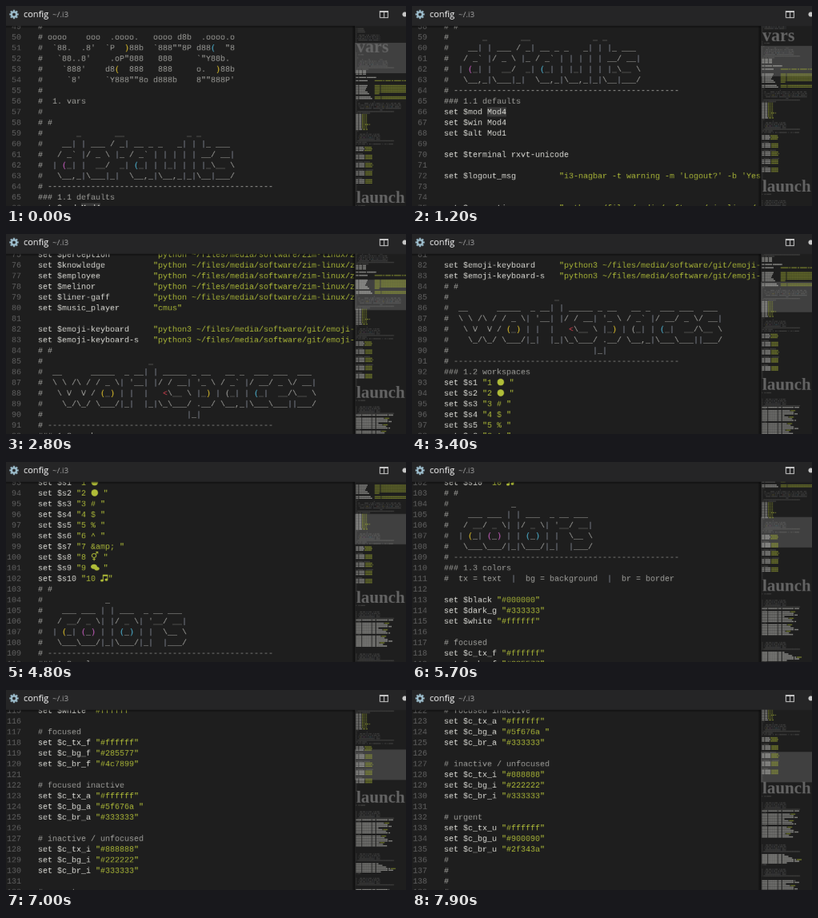
Write an HTML page with a canvas that moves like this. It is 500 by 250 pixels and loops after 8000 ms.

```html
<!DOCTYPE html>
<html lang="en">
<head>
<meta charset="utf-8">
<title>config</title>
<style>
html, body { margin: 0; width: 100%; height: 100%; overflow: hidden; background: #1e1e1e; }
canvas { display: block; }
</style>
</head>
<body>
<canvas id="stage" width="500" height="250"></canvas>
<script>
const stage = document.getElementById('stage').getContext('2d');
stage.imageSmoothingQuality = 'high';

// The editor is drawn at 1.5 times its size and scaled down like a screen recording.
const SCALE = 1.5;
const screen = document.createElement('canvas');
screen.width = 500 * SCALE;
screen.height = 250 * SCALE;
const ctx = screen.getContext('2d');
ctx.scale(SCALE, SCALE);

const LOOP = 8000, TICK = 100;
const FIRST = 50;                       // line at the top of the view at time zero
const HOLDS = [1, 3, 8, 27, 35, 46, 76, 78];
const DOUBLES = [24, 28];
const LINE = 20 / SCALE, BASELINE = 42, CHAR = 6, TEXT_X = 40;
const TOP = 25, MAP_X = 436, MAP_LINE = 2.03;

const color = {
  bg: '#1e1e1e', bar: '#252526', number: '#606060', code: '#e4e4de', string: '#b0bd38',
  comment: '#a4a4a0', stroke: '#9ca2b2', yellow: '#e6c62c', cyan: '#4fb8d8', pink: '#cc60c4', red: '#d84050'
};

const rule = '# ' + '-'.repeat(47);
const lines = {};
function put(start, text) {
  text.split('\n').forEach((line, i) => { lines[start + i] = line; });
}
const define = (name, value) => ('set $' + name).padEnd(24) + value;
const zim = '"python ~/files/media/software/zim-linux/zim.py"';
const emoji = '"python3 ~/files/media/software/git/emoji-keyboard"';

put(40, String.raw`# bindings
# variables
# workspaces
#
#   ___ ___  _ __  / _(_) __ _
#  / __/ _ \| '_ \| |_| |/ _' |
# | (_| (_) | | | |  _| | (_| |
#  \___\___/|_| |_|_| |_|\__, |
#
#
# oooo    ooo  .oooo.   oooo d8b  .oooo.o
#  ${'`'}88.  .8'  ${'`'}P  )88b  ${'`'}888""8P d88(  "8
#   ${'`'}88..8'    .oP"888   888     ${'`'}"Y88b.
#    ${'`'}888'    d8(  888   888     o.  )88b
#     ${'`'}8'     ${'`'}Y888""8o d888b    8""888P'
#
#  1. vars
#
# #
#       _       __             _ _
#    __| | ___ / _| __ _ _   _| | |_ ___
#   / _${'`'} |/ _ \ |_ / _${'`'} | | | | | __/ __|
#  | (_| |  __/  _| (_| | |_| | | |_\__ \
#   \__,_|\___|_|  \__,_|\__,_|_|\__|___/
${rule}
### 1.1 defaults
set $mod Mod4
set $win Mod4
set $alt Mod1

set $terminal rxvt-unicode
`);
put(72, [
  define('logout_msg', `"i3-nagbar -t warning -m 'Logout?' -b 'Yes' 'exit'"`), '', '',
  ...['perception', 'knowledge', 'employee', 'melinor', 'liner-gaff'].map(n => define(n, zim)),
  define('music_player', '"cmus"'), '',
  define('emoji-keyboard', emoji), define('emoji-keyboard-s', emoji)
].join('\n'));
put(84, String.raw`# #
#                      _
#  __      _____  _ __| | _____ _ __   __ _  ___ ___  ___
#  \ \ /\ / / _ \| '__| |/ / __| '_ \ / _${'`'} |/ __/ _ \/ __|
#   \ V  V / (_) | |  |   <\__ \ |_) | (_| | (_|  __/\__ \
#    \_/\_/ \___/|_|  |_|\_\___/ .__/ \__,_|\___\___||___/
#                              |_|
${rule}
### 1.2 workspaces`);
put(93, ['● ', '● ', '# ', '$ ', '% ', '^ ', '&amp; ', '⚥ ', '◖ ', '♫']
  .map((mark, i) => `set $s${i + 1} "${i + 1} ${mark}"`).join('\n'));
put(103, String.raw`# #
#             _
#    ___ ___ | | ___  _ __ ___
#   / __/ _ \| |/ _ \| '__/ __|
#  | (_| (_) | | (_) | |  \__ \
#   \___\___/|_|\___/|_|  |___/
${rule}
### 1.3 colors
#  tx = text  |  bg = background  |  br = border

set $black "#000000"
set $dark_g "#333333"
set $white "#ffffff"
`);
function palette(start, title, suffix, values) {
  const rows = ['tx', 'bg', 'br'].map((k, i) => `set $c_${k}_${suffix} "${values[i]}"`);
  put(start, ['# ' + title, ...rows, ''].join('\n'));
}
palette(117, 'focused', 'f', ['#ffffff', '#285577', '#4c7899']);
palette(122, 'focused inactive', 'a', ['#ffffff', '#5f676a ', '#333333']);
palette(127, 'inactive / unfocused', 'i', ['#888888', '#222222', '#333333']);
palette(132, 'urgent', 'u', ['#ffffff', '#900090', '#2f343a']);
put(136, '#\n#\n#\n#\n#');

// Lines below the view that only the minimap shows.
put(149, '#  2. launch');
for (const start of [153, 179, 194]) {
  put(start, [105, 106, 107, 108].map(n => lines[n]).join('\n') + '\n' + rule);
}
for (const [from, to] of [[158, 174], [185, 191], [201, 214]]) {
  for (let n = from; n <= to; n++) {
    const key = 'abcdefgh'[n % 8];
    const words = `bindsym $mod+Shift+${key} exec --no-startup-id i3-msg workspace`;
    put(n, n % 8 === 7 ? '# keys' : words.slice(0, 28 + n * 5 % 22) + (n % 4 ? '' : ' "cmus"'));
  }
}

const { yellow, cyan, pink, red, comment } = color;
const brackets = {
  51: [yellow, cyan], 53: [yellow, yellow], 62: [pink, cyan],
  88: [yellow, yellow, red, yellow, comment, cyan],
  107: [yellow, pink, pink, cyan, cyan]
};

// Splits a line into coloured characters.
function colorize(n) {
  const text = lines[n] || '';
  const isComment = text[0] === '#';
  const quote = text.indexOf('"');
  let found = 0;
  return [...text].map((ch, i) => {
    if (!isComment) return [ch, quote >= 0 && i >= quote ? color.string : color.code];
    if ('()<'.includes(ch)) return [ch, (brackets[n] || [])[found++] || comment];
    return [ch, ch === '|' ? color.stroke : comment];
  });
}

function disc(x, y, rx, ry = rx) {
  ctx.beginPath();
  ctx.ellipse(x, y, rx, ry, 0, 0, Math.PI * 2);
  ctx.fill();
}

const icons = {
  '●': (x, y) => disc(x + 4.8, y - 3.5, 4.3),
  '◖': (x, y) => { disc(x + 4, y - 4.5, 4, 3); disc(x + 7.5, y - 2, 3.2, 2.3); },
  '⚥': (x, y) => {
    ctx.save();
    ctx.font = '11px "DejaVu Sans", sans-serif';
    ctx.fillText('⚥', x, y);
    ctx.restore();
  },
  '♫': (x, y) => {
    disc(x + 2, y - 0.5, 1.9, 1.5);
    disc(x + 7.5, y - 1.5, 1.9, 1.5);
    ctx.fillRect(x + 2.9, y - 7, 1, 6.5);
    ctx.fillRect(x + 8.4, y - 8, 1, 6.5);
    ctx.fillRect(x + 2.9, y - 8, 6.5, 2);
  }
};

function drawLine(n, y) {
  ctx.textAlign = 'right';
  ctx.fillStyle = color.number;
  ctx.fillText(n, 19, y);
  ctx.textAlign = 'left';
  if (n === 66) {
    ctx.fillStyle = '#383838';
    ctx.fillRect(TEXT_X + 9 * CHAR, y - 9, 4 * CHAR, 12);
  }
  let x = TEXT_X;
  for (const [ch, fill] of colorize(n)) {
    ctx.fillStyle = fill;
    if (icons[ch]) {
      icons[ch](x, y);
      x += 9.7;
    } else {
      ctx.fillText(ch, x, y);
      x += CHAR;
    }
    if (x > MAP_X) break;
  }
}

// Fills a box with black that fades out between two points.
function shadow(x, y, w, h, x0, y0, x1, y1) {
  const fade = ctx.createLinearGradient(x0, y0, x1, y1);
  fade.addColorStop(0, 'rgba(0,0,0,.55)');
  fade.addColorStop(1, 'rgba(0,0,0,0)');
  ctx.fillStyle = fade;
  ctx.fillRect(x, y, w, h);
}

function drawMinimap(line) {
  const moved = line - FIRST;
  const sliderY = 46 + 0.43 * moved;
  const mapY = n => sliderY + (n - line + 1) * MAP_LINE;

  ctx.fillStyle = color.bg;
  ctx.fillRect(MAP_X, TOP, 64, 225);
  shadow(MAP_X - 4, TOP, 4, 225, MAP_X, 0, MAP_X - 4, 0);
  ctx.fillStyle = 'rgba(255,255,255,.15)';
  ctx.fillRect(MAP_X, sliderY, 64, 38);

  for (let n = 40; n <= 214; n++) {
    const y = mapY(n);
    if (y < TOP - 2 || y > 250 || (n >= 50 && n <= 54)) continue;
    ctx.globalAlpha = (lines[n] || '')[0] === '#' ? 0.27 : 0.65;
    colorize(n).forEach(([ch, fill], i) => {
      if (ch === ' ') return;
      ctx.fillStyle = fill;
      ctx.fillRect(437.5 + i * 0.97, y, 0.85, 1.33);
    });
  }
  ctx.globalAlpha = 1;
  ctx.fillStyle = '#646464';
  ctx.font = 'bold 22px "Liberation Serif", serif';
  ctx.fillText('vars', 438, mapY(55));
  ctx.font = 'bold 21px "Liberation Serif", serif';
  ctx.fillText('launch', 438, mapY(147.6));
}

function drawHeader() {
  ctx.fillStyle = color.bar;
  ctx.fillRect(0, 0, 500, TOP);
  shadow(0, TOP, MAP_X, 2.5, 0, TOP, 0, TOP + 2.5);

  ctx.strokeStyle = ctx.fillStyle = '#9cbccb';
  ctx.lineWidth = 2.4;
  ctx.beginPath();
  ctx.arc(10, 10.5, 3.1, 0, Math.PI * 2);
  ctx.stroke();
  for (let i = 0; i < 8; i++) {
    ctx.save();
    ctx.translate(10, 10.5);
    ctx.rotate(i * Math.PI / 4);
    ctx.fillRect(-1.1, -5.7, 2.2, 2.2);
    ctx.restore();
  }

  ctx.fillStyle = '#fff';
  ctx.font = '11px "Open Sans", sans-serif';
  ctx.fillText('config', 22, 14);
  ctx.fillStyle = '#a8a8a8';
  ctx.font = '10px "Open Sans", sans-serif';
  ctx.fillText('~/.i3', 58, 14);

  ctx.strokeStyle = ctx.fillStyle = '#c8c8c8';
  ctx.lineWidth = 1;
  ctx.strokeRect(467.5, 6.5, 10, 8);
  ctx.fillRect(467, 6, 11, 2);
  ctx.fillRect(472, 7, 1, 8);
  disc(498.5, 10.5, 3);
}

function lineAt(tick) {
  const passed = list => list.filter(k => k <= tick).length;
  return FIRST + tick - passed(HOLDS) + passed(DOUBLES);
}

function draw(line) {
  ctx.fillStyle = color.bg;
  ctx.fillRect(0, 0, 500, 250);
  ctx.font = '10px "Liberation Mono", monospace';
  for (let n = line - 1; n <= line + 17; n++) {
    drawLine(n, BASELINE + (n - line) * LINE);
  }
  drawMinimap(line);
  drawHeader();
  stage.drawImage(screen, 0, 0, 500, 250);
}

let shown = -1;
function frame() {
  const line = lineAt(Math.floor(performance.now() % LOOP / TICK));
  if (line !== shown) draw(shown = line);
  requestAnimationFrame(frame);
}
frame();
</script>
</body>
</html>
```
